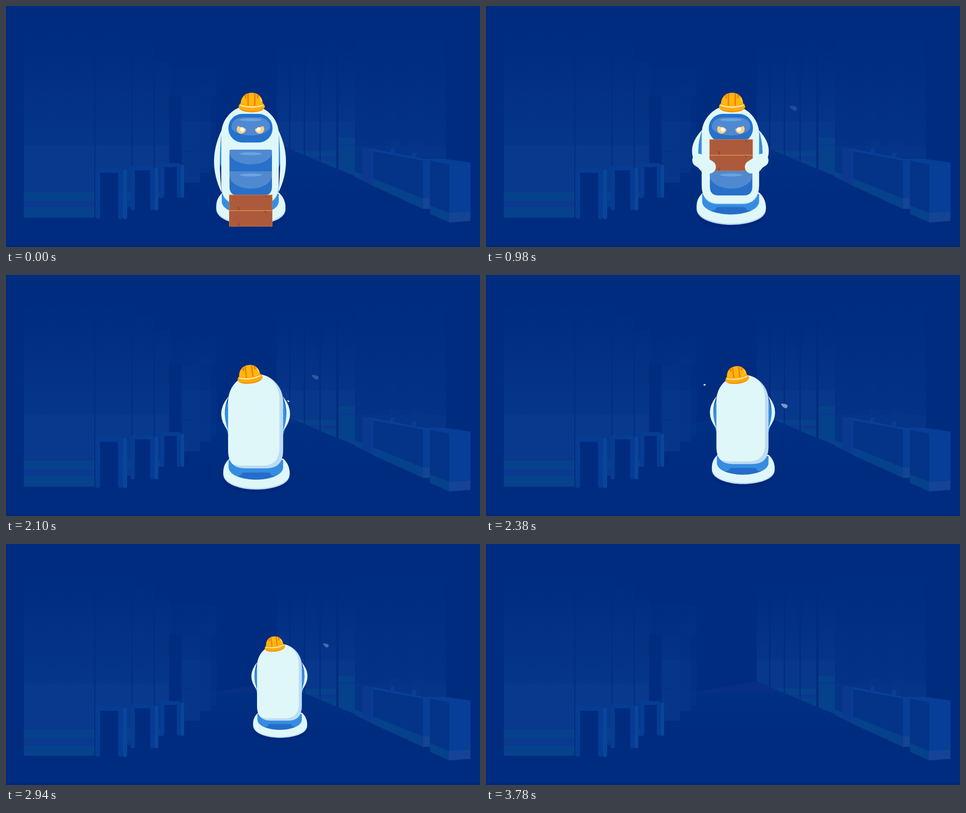
An HTML page that plays this animation: 982x500 px, repeating every 4200 ms.

```html
<!DOCTYPE html>
<html lang="en">
<head>
<meta charset="utf-8">
<title>Robot carrying planks</title>
<style>
html, body { margin: 0; width: 100%; height: 100%; overflow: hidden; background: #002c80; }
svg { display: block; width: 982px; height: 500px; }
.teal { fill: #06418b; } .band { fill: #0a398f; } .panel { fill: #033487; } .edge { fill: #073f98; } .foot { fill: #154396; }
.white { fill: #dff7f8; } .shade { fill: #bcdcf5; } .blue { fill: #368de0; } .deep { fill: #2870c9; }
.glass { fill: #5089d0; } .shine { fill: #69a5e2; }
</style>
</head>
<body>
<svg viewBox="0 0 982 500">
<defs>
  <linearGradient id="wall" gradientUnits="userSpaceOnUse" x1="0" x2="0" y1="60" y2="290">
    <stop offset="0" stop-color="#002c80"/><stop offset=".45" stop-color="#033083"/>
    <stop offset="1" stop-color="#053689"/><stop offset="1" stop-color="#08398c"/>
  </linearGradient>
  <linearGradient id="far" gradientUnits="userSpaceOnUse" x1="0" x2="0" y1="80" y2="240">
    <stop offset="0" stop-color="#002c80"/><stop offset="1" stop-color="#053488"/><stop offset="1" stop-color="#08388b"/>
  </linearGradient>
  <linearGradient id="floor" x1="0" x2="0" y1="0" y2="1">
    <stop offset="0" stop-color="#003083"/><stop offset="1" stop-color="#002c80"/>
  </linearGradient>
  <clipPath id="rightWall"><path d="M561 0H723V353L689 339L561 285Z"/></clipPath>
  <path id="shell" d="M446 266A59.5 59.5 0 0 1 565 266V372Q565 411 529 411H482Q446 411 446 372Z"/>
  <clipPath id="inShell"><use href="#shell"/></clipPath>
  <path id="eye" d="M480.500 249L497 255A9.500 9.500 0 1 1 480.500 249Z"/>
  <path id="drop" d="M-9 -1Q-2 -5 3 -5A4.500 4.500 0 1 1 3 4Q-3 4 -9 -1Z"/>
</defs>

<!-- hall -->
<rect width="982" height="500" fill="#002c80"/>
<rect y="495" width="982" height="5" fill="#002a79"/>
<path d="M436 307L560 285L618 309H436Z" fill="#082f83"/>
<path d="M368 308H618L689 339L780 385H368Z" fill="url(#floor)"/>
<path d="M37 60H183V439H37ZM185 60H260V417H185ZM262 85H306V400H262ZM308 115H338V398H308Z" fill="url(#wall)"/>
<path class="teal" d="M37 385H183V439H37ZM249 384H260V403H249ZM315 385H322V398H315Z"/>
<path class="band" d="M37 403H183V417H37Z"/>
<g fill="url(#far)">
  <path d="M338 128H436V186H338Z" opacity=".6"/>
  <path d="M364 186H402V366H364Z" opacity=".8"/>
  <path d="M402 168H424V346H402Z" opacity=".6"/>
  <path d="M424 128H436V336H424Z" opacity=".35"/>
</g>
<path d="M364 186H384M364 301.500H390" stroke="#002c80"/>
<g id="gates"></g>
<g clip-path="url(#rightWall)">
  <g id="panes"></g>
  <path d="M689 30H723V400H689Z" fill="url(#far)"/>
  <path class="teal" d="M689 273H723V400H689Z"/>
  <path class="band" d="M689 287H723V291H689Z"/>
</g>
<path d="M723 70H810V310H723ZM810 70H911V318H810Z" fill="url(#wall)" opacity=".65"/>
<path class="panel" d="M723 295H740V350L723 343Z"/>
<path class="teal" d="M723 343L740 350V363L723 355Z"/>
<path d="M795 280H816L818 307H796ZM838 283H864L865 316H840Z" fill="#063488"/>
<path class="edge" d="M797 297L804 295V306H796ZM842 305L851 303L849 314H839Z"/>
<path class="edge" d="M722 294L760 296L864 317H908L962 325V426L918 429V329L878 321V400H864V321L761 302V373L758 371V297Z"/>
<path class="band" d="M738 295H758V372L738 362Z"/>
<path class="panel" d="M762 302L864 321V399L762 358ZM878 321L918 329V429L878 413Z"/>
<path class="teal" d="M762 358L864 399V421L759 373ZM878 413L918 429V449L878 431Z"/>
<path class="foot" d="M864 399H878V421H864ZM918 429L962 426V446L918 449Z"/>

<!-- robot -->
<g id="robot">
  <ellipse cx="507" cy="437" rx="70" ry="24" fill="#00267a" opacity=".65"/>
  <path class="shade" d="M449 387C436 398 435 410 435.500 422C437 444 475 454 507 454C540 454 579 444 579 422C579 410 577 398 565 387Z"/>
  <path class="white" d="M449 387C437 398 436 410 436 419C438 442 475 451 507 451C540 451 577 442 579 419C579 410 577 398 565 387Z"/>
  <path class="blue" d="M447 390V406C449 441 563 441 565 406V390Z"/>
  <path d="M474 423Q475 417 481 417H532Q538 417 539 423L548 425Q507 440 465 425Z" fill="#256dc9"/>
  <path id="sideL" class="blue" d="M447 257Q431 296 447 338Z"/>
  <use href="#sideL" transform="matrix(-1 0 0 1 1011 0)"/>
  <g id="body">
    <use href="#shell" class="shade"/>
    <g clip-path="url(#inShell)">
      <use id="light" href="#shell" class="white"/>
      <g id="face">
        <rect x="462" y="225" width="89" height="57" rx="28" class="deep" stroke="#1a78de" stroke-width="2.500"/>
        <path class="glass" d="M467 252C467 238 478 231 493 231H521C536 231 547 238 547 252C540 274 474 274 467 252Z"/>
        <ellipse class="shine" cx="507" cy="236" rx="23" ry="3"/>
        <g id="eyeL"><use href="#eye" fill="#f4d28d"/><circle cx="489.500" cy="256" r="4.500" fill="#fffbe8"/></g>
        <use href="#eyeL" transform="matrix(-1 0 0 1 1013 0)"/>
        <path class="deep" d="M467 298H547Q551 298 551 302V375Q551 393 533 393H481Q463 393 463 375V302Q463 298 467 298Z"/>
        <path class="glass" d="M463 306C470 336 544 336 551 306V302Q551 298 547 298H467Q463 298 463 302ZM463 343H551V354C544 387 470 387 463 354Z"/>
        <ellipse class="shine" cx="507" cy="306.500" rx="23" ry="3"/>
        <ellipse class="shine" cx="507" cy="350.500" rx="23" ry="3"/>
      </g>
    </g>
  </g>
  <g id="planks">
    <path d="M462.500 392H551.500V457H462.500Z" fill="#ad5a3c" stroke="#c98345"/>
    <path d="M462.500 424.500H551.500" stroke="#dc9648" stroke-width="1.500"/>
    <path d="M536 393L540 398M544 393V396M482 424V418L480 416M536 425L539 430M481 456L484 451" stroke="#85402c" stroke-width="1.500" fill="none"/>
  </g>
  <g id="armL">
    <path id="upperArm" class="white"/>
    <path id="forearm" stroke="#dff7f8" stroke-linecap="round"/>
  </g>
  <use href="#armL" transform="matrix(-1 0 0 1 1011 0)"/>
  <g id="hat">
    <path d="M486 207C485 190 495 180 509 180C523 180 533 190 532 207Q509 216 486 207Z" fill="#ffb70d"/>
    <path d="M501.500 182V209M515.500 182V209" stroke="#f4780c" stroke-width="2.800"/>
    <path d="M496.500 184V190M521.500 184V190" stroke="#f4780c" stroke-width="3" stroke-linecap="round"/>
    <path d="M527 190Q529 193 529 198" stroke="#ffe9a6" stroke-width="1.500" fill="none"/>
    <path d="M486 202Q482 205 482 210C485 224 533 224 536 210Q536 205 532 202Q509 213 486 202Z" fill="#f58b00"/>
    <path d="M486 202Q482 205 482 209C485 221 533 221 536 209Q536 205 532 202Q509 213 486 202Z" fill="#ffad08"/>
    <path d="M486 206Q509 213.500 532 206" stroke="#fff6d8" stroke-width="2" fill="none" stroke-linecap="round"/>
  </g>
</g>
<g id="drops" fill="#fff"></g>
</svg>
<script>
const LOOP = 4200, STEP = 70, END = 3780;
const $ = id => document.getElementById(id);
const set = (el, name, value) => el.setAttribute(name, value);
const mix = (a, b, p) => a + (b - a) * p;
const span = (t, from, to) => Math.min(1, Math.max(0, (t - from) / (to - from)));
const ease = (t, from, to) => {
  const p = span(t, from, to);
  return p * p * (3 - 2 * p);
};

// gates shrink with depth, farthest first
$('gates').innerHTML = [2, 1, 0].map(i => {
  const left = 185 + 78.5 * i - 5.5 * i * i, right = left + 57 - 7.5 * i;
  const top = 336 - 3 * i - i * i, bottom = 442 - 14 * i - 4 * i * i;
  const post = 10 - i, half = post / 2;
  return `
    <path d="M${left + half} ${top + half}H${right - half}V${bottom}H${left + half}Z" fill="#002c80"/>
    <rect x="${right}" y="${top + 3}" width="${post - 1}" height="${bottom - top - 3}" rx="4" fill="#09459b"/>
    <path d="M${left + half} ${bottom - half}V${top + half}H${right - half}V${bottom - half}" fill="none"
      stroke="#063c93" stroke-width="${post}" stroke-linecap="round" stroke-linejoin="round"/>`;
}).join('');

// panes of the right wall widen towards the viewer
const paneX = i => 561 + 27 * i + 1.1 * i * i;
$('panes').innerHTML = [0, 1, 2, 3].map(i => {
  const strip = (y, look) => `<rect x="${paneX(i)}" y="${y}" width="${paneX(i + 1) - paneX(i) - 2.5}" height="300" ${look}/>`;
  return strip(80, 'fill="url(#far)"') + strip(300, 'class="teal"') + strip(312, 'class="band"') + strip(321, 'class="teal"');
}).join('');

// walks right and away, then bends left and away faster
function place(t) {
  const out = span(t, 1750, 2940), back = span(t, 2940, END);
  const shrink = .22 * out ** 1.35 + .4 * (1 - (1 - back) ** 1.4);
  return {
    x: 507 + 60.7 * out ** 1.35 - 68 * back,
    y: 452 - shrink * (200 + 150 * shrink),
    scale: 1 - shrink
  };
}

const emitters = [
  { side: -1, start: 40, every: 1160, count: 3 },
  { side: 1, start: 65, every: 425, count: 2 },
  { side: 1, start: 1190, every: 450, count: 4 }
];
const FLIGHT = 560;
const flights = emitters.flatMap(({ side, start, every, count }) =>
  Array.from({ length: count }, (_, i) => ({ side, start: start + i * every, low: side > 0 && i === 2 })));
$('drops').innerHTML = '<use href="#drop"/>'.repeat(flights.length);

function drawDrop(el, { side, start, low }, t, { x, y, scale }) {
  const p = (t - start) / FLIGHT;
  const dx = side * (86 - 18 * low + 50 * p);
  const dy = (low ? -190 : side < 0 ? -226 : -262) + 25 * p;
  set(el, 'opacity', p >= 0 && p < 1 ? 1 - p : 0);
  set(el, 'transform', `translate(${x + scale * dx} ${y + scale * dy})
    scale(${side * scale * Math.min(1, .3 + 1.6 * p)} ${scale * Math.min(1, .3 + 1.6 * p)}) rotate(25)`);
}

// a crescent from the shoulder; the forearm swings out to the hand
function drawArm(grip, turn) {
  const blend = (down, hug, back) => mix(mix(down, hug, grip), back, turn);
  const outer = blend(431, 426, 431), inner = blend(443, 439, 439);
  const top = blend(257, 257, 252), bottom = blend(388, 345, 328), middle = (top + bottom) / 2;
  const reach = grip * (1 - turn);
  set($('upperArm'), 'd',
    `M447 ${top}Q${2 * outer - 447} ${middle} 447 ${bottom}Q${2 * inner - 447} ${middle} 447 ${top}Z`);
  set($('forearm'), 'd', `M440 320L${440 + 22 * reach} ${320 + 14 * reach}`);
  set($('forearm'), 'stroke-width', 27 * reach);
}

function around(angle, radius) {
  return `translate(${506.5 - radius * Math.sin(angle)} 0) scale(${Math.cos(angle)} 1) translate(-506.5 0)`;
}

function draw(t) {
  const gone = t >= END;
  $('robot').style.display = $('drops').style.display = gone ? 'none' : '';
  if (gone) return;

  const grip = ease(t, 210, 700), lift = ease(t, 280, 840), turn = ease(t, 1190, 1610);
  const angle = turn * Math.PI;
  const spot = place(t), sway = .8 * lift * (1 - turn);

  set($('robot'), 'transform',
    `translate(${spot.x + sway} ${spot.y}) scale(${spot.scale}) translate(-507 -452)`);
  set($('robot'), 'opacity', 1 - span(t, 3430, END));
  set($('body'), 'transform', `translate(0 ${-3 * turn})`);
  set($('light'), 'transform', `translate(${-8 * turn} ${-2 - 4 * turn})`);
  set($('face'), 'transform', around(angle, 60));
  set($('planks'), 'transform', `${around(angle, 70)} translate(0 ${-115 * lift})`);
  $('face').style.display = $('planks').style.display = turn < .5 ? '' : 'none';
  set($('hat'), 'transform', `translate(${-16 * turn} ${4 * turn}) rotate(${-7 * turn} 509 205)`);
  drawArm(grip, turn);
  flights.forEach((flight, i) => drawDrop($('drops').children[i], flight, t, spot));
}

const begin = performance.now();
function tick() {
  const t = (performance.now() - begin) % LOOP;
  draw(Math.floor(t / STEP) * STEP);
  requestAnimationFrame(tick);
}
tick();
</script>
</body>
</html>
```
